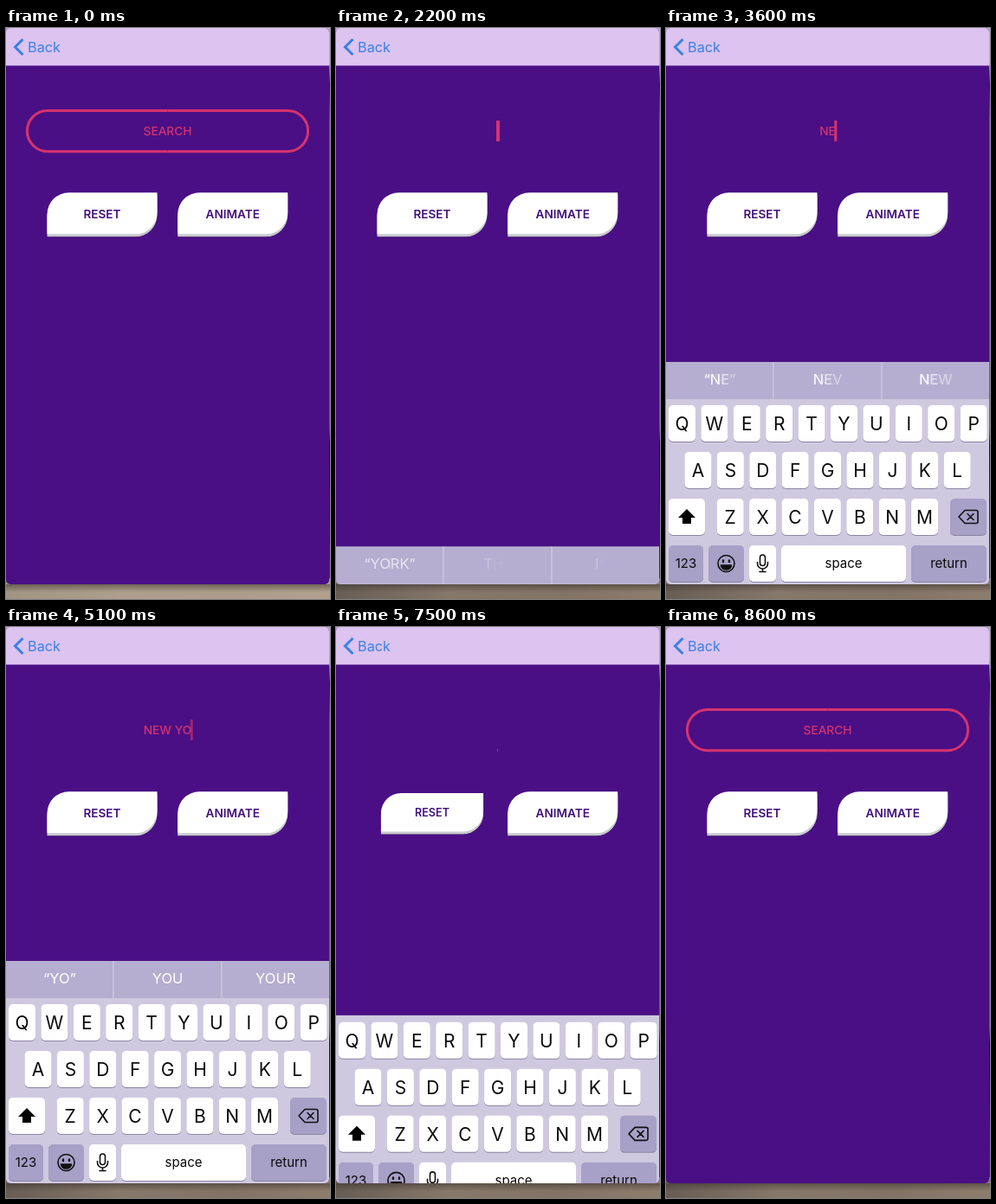
Write an HTML page that moves like this. It is 374x660 px and loops after 8.8 s.

```html
<!DOCTYPE html>
<html lang="en">
<head>
<meta charset="utf-8">
<style>
html, body { margin: 0; width: 100%; height: 100%; overflow: hidden; background: #6f6358; }
svg { display: block; width: 374px; height: 660px; }
text { font-family: Inter, Roboto, sans-serif; text-anchor: middle; }
.pink { font-size: 13.7px; font-weight: 500; fill: #d6336c; }
.btn { font-size: 13.6px; font-weight: 600; fill: #42107a; }
.key { font-size: 21px; fill: #0a0a0a; }
.word { font-size: 15px; fill: #0a0a0a; }
.hint { font-size: 16.5px; fill: #fff; }
.icon { fill: none; stroke: #111; stroke-width: 1.6; stroke-linecap: round; stroke-linejoin: round; }
</style>
</head>
<body>
<svg viewBox="0 0 374 660">
  <defs>
    <linearGradient id="floor">
      <stop offset="0" stop-color="#675d54"/><stop offset=".35" stop-color="#86786a"/>
      <stop offset=".7" stop-color="#827365"/><stop offset="1" stop-color="#8d7d6d"/>
    </linearGradient>
    <linearGradient id="shade" x2="0" y2="1">
      <stop offset="0" stop-color="#3c342e" stop-opacity=".55"/><stop offset="1" stop-color="#3c342e" stop-opacity="0"/>
    </linearGradient>
    <linearGradient id="edge" x2="0" y2="1">
      <stop offset="0" stop-color="#b9a9c4"/><stop offset=".06" stop-color="#b9a9c4"/>
      <stop offset=".1" stop-color="#2c2038"/><stop offset=".16" stop-color="#6d5a80"/>
      <stop offset=".7" stop-color="#6d5a80"/><stop offset=".73" stop-color="#17101e"/><stop offset="1" stop-color="#4a3d55"/>
    </linearGradient>
    <clipPath id="screen"><rect width="373" height="643" rx="5"/></clipPath>
  </defs>
  <rect width="374" height="660" fill="url(#edge)"/>
  <rect y="636" width="374" height="24" fill="url(#floor)"/>
  <rect id="glow" y="636" width="374" height="24" fill="#c9b9a4"/>
  <rect y="643" width="374" height="9" fill="url(#shade)"/>
  <g clip-path="url(#screen)">
    <rect width="373" height="643" fill="#4a0f85"/>
    <rect width="373" height="43.5" fill="#dcc3f0"/>
    <path d="M19.5 13L10.5 22L19.5 31" fill="none" stroke="#3a80e8" stroke-width="3"/>
    <text x="44" y="27.8" font-size="16.2" fill="#3a80e8">Back</text>
    <g id="border" fill="none" stroke="#d6336c" stroke-width="3"></g>
    <text id="label" class="pink" x="186.5" y="123.5">SEARCH</text>
    <text id="typed" class="pink" x="186.5" y="123.5"></text>
    <rect id="caret" fill="#d6336c" rx=".5"/>
    <g id="buttons"></g>
    <g id="keyboard">
      <rect y="0" width="373" height="300" fill="#cfc9e0"/>
      <g id="bar">
        <rect width="373" height="43" fill="#b5aed0"/>
        <path d="M124 0V43M249 0V43" stroke="#cbc4df" stroke-width="1.5"/>
        <g id="hints"></g>
      </g>
      <g id="keys"></g>
    </g>
  </g>
</svg>
<script>
const LOOP = 8800;
const $ = id => document.getElementById(id);
const clamp = v => Math.min(1, Math.max(0, v));
const span = (t, a, b) => clamp((t - a) / (b - a));
const ease = x => x < .5 ? 2 * x * x : 1 - 2 * (1 - x) ** 2;
const settle = ms => { const x = Math.max(0, ms) * .018; return 1 - Math.exp(-x) * (1 + x); };

// time, typed text, three suggestions
const steps = [
  [2160, '', 'I', 'THE', "I'M"],
  [3150, 'N', '“N”', 'NO', 'NOT'],
  [3500, 'NE', '“NE”', 'NEV', 'NEW'],
  [3850, 'NEW', '“NEW”', 'NEWS', 'NEWER'],
  [4150, 'NEW\u00a0', 'YORK', 'YEAR', 'ONE'],
  [4400, 'NEW\u00a0Y', '“Y”', 'YOU', 'YORK'],
  [4650, 'NEW\u00a0YO', '“YO”', 'YOU', 'YOUR'],
  [5350, 'NEW\u00a0YOR', '“YOR”', 'YORK', 'YOUR'],
  [5750, 'NEW\u00a0YORK', '“YORK”', '', '']
];

// Both halves of the search outline start at the bottom centre.
$('border').innerHTML = [-1, 1].map(s =>
  `<path pathLength="100" d="M186.5 142.7h${s * 138.5}a23.6 23.6 0 0 ${s > 0 ? 0 : 1} 0 -47.2h${-s * 138.5}"/>`).join('');
const halves = [...$('border').children];

const leaf = 'M-63.5 -24V1A0 0 0 0 1 -63.5 24H38.5A25 25 0 0 0 63.5 -1V-24H-38.5A25 25 0 0 0 -63.5 1Z';
const button = (id, text) => `<g id="${id}">
  <path d="${leaf}" transform="translate(0 3.6)" fill="#1c0638" opacity=".5"/>
  <path d="${leaf}" transform="translate(0 3)" fill="#c9c8ce"/>
  <path d="${leaf}" fill="#fff"/><text class="btn" y="5.5">${text}</text></g>`;
$('buttons').innerHTML = button('reset', 'RESET') + button('animate', 'ANIMATE');

const key = (x, y, w, text = '', cls = 'key', fill = '#fff') =>
  `<rect x="${x}" y="${y + 1}" width="${w}" height="42" rx="5" fill="#8b86a3"/>
   <rect x="${x}" y="${y}" width="${w}" height="42" rx="5" fill="${fill}"/>
   <text class="${cls}" x="${x + w / 2}" y="${y + (cls === 'key' ? 29 : 26)}">${text}</text>`;
const row = (letters, x, y) => [...letters].map((c, i) => key(x + i * 37.4, y, 31, c)).join('');
const dark = '#a7a0c7';
$('keys').innerHTML = row('QWERTYUIOP', 3, 50) + row('ASDFGHJKL', 21.5, 104) + row('ZXCVBNM', 58.7, 158) +
  key(3, 158, 42) + key(328, 158, 42, '', 'key', dark) +
  key(3, 212, 40, '123', 'word', dark) + key(49, 212, 41, '', 'word', dark) + key(96, 212, 31) +
  key(133, 212, 144, 'space', 'word') + key(283, 212, 87, 'return', 'word', dark) +
  `<path d="M24 170l10 10h-5v7h-10v-7h-5z" fill="#000"/>
  <g class="icon">
    <path d="M338 179l7-7.5h13a2 2 0 0 1 2 2v11a2 2 0 0 1-2 2h-13zM348 175.500l7 7m0-7l-7 7"/>
    <circle cx="69.500" cy="233" r="9.500"/>
    <path d="M63.500 235h12a6 5 0 0 1-12 0z" fill="#111"/>
    <path d="M66 229.500v1.500M73 229.500v1.500" stroke-width="2.400"/>
    <rect x="108.500" y="223" width="6" height="12.500" rx="3"/>
    <path d="M105.500 231.500v1.500a6 6 0 0 0 12 0v-1.500M111.500 239v3.500m-3.500 0h7"/>
  </g>`;

// New letters fade in one after another over the fading old word.
function hint(now, old, x, age) {
  let same = 0;
  while (same < now.length && now[same] === old[same]) same++;
  const letters = [...now].map((c, i) =>
    `<tspan fill-opacity="${i < same ? 1 : clamp((age - 30 * (i - same)) / 150)}">${c}</tspan>`).join('');
  const ghost = now === old ? 0 : clamp(1 - age / 120);
  return `<text class="hint" x="${x}" y="25.5" opacity="${ghost}">${old}</text>
    <text class="hint" x="${x}" y="25.5">${letters}</text>`;
}

function press(id, x, t, start) {
  const s = 1 - .07 * (ease(span(t, start, start + 180)) - ease(span(t, start + 220, start + 420)));
  $(id).setAttribute('transform', `translate(${x} 214.3) scale(${s})`);
}

function blink(age) {
  const p = age % 1000;
  return p < 800 ? 1 - span(p, 350, 600) : span(p, 800, 1000);
}

function draw(t) {
  const closing = t >= 7472;
  const drawn = closing ? ease(span(t, 7476, 8400)) : 1 - ease(span(t, 1000, 1950));
  halves.forEach(p => p.setAttribute('stroke-dasharray', `${drawn * 100} 200`));
  $('border').setAttribute('visibility', drawn > 0 ? 'visible' : 'hidden');
  $('label').setAttribute('opacity', closing ? span(t, 7900, 8300) : 1 - span(t, 950, 1450));
  $('glow').setAttribute('opacity', .6 * clamp(1 - t / 350));
  press('animate', 261.7, t, 900);
  press('reset', 111, t, 7300);

  const n = Math.max(0, steps.findLastIndex(s => t >= s[0]));
  const [start, text, ...words] = steps[n];
  const old = n ? steps[n - 1].slice(2) : ['“YORK”', '', ''];
  $('hints').innerHTML = words.map((w, i) => hint(w, old[i], 62 + i * 124.6, t - start)).join('');

  const typed = $('typed'), caret = $('caret');
  typed.textContent = closing ? '' : text;
  const half = typed.textContent ? typed.getComputedTextLength() / 2 : 0;
  const grow = closing ? 0 : 24 * ease(span(t, 1930, 2130));
  caret.setAttribute('x', 185 + half);
  caret.setAttribute('y', 131 - grow);
  caret.setAttribute('width', t < 2300 ? 4 : 3);
  caret.setAttribute('height', grow);
  caret.setAttribute('opacity', t < start ? 1 : blink(t - start));

  const top = closing ? 386 + 215 * settle(t - 7472) : 643 - 257 * settle(t - 2160);
  $('keyboard').setAttribute('transform', `translate(0 ${top})`);
  $('keyboard').firstElementChild.setAttribute('y', closing ? 42 : 0);
  $('bar').setAttribute('visibility', closing ? 'hidden' : 'visible');
}

const begin = performance.now();
function tick() {
  draw((performance.now() - begin) % LOOP);
  requestAnimationFrame(tick);
}
tick();
</script>
</body>
</html>
```
